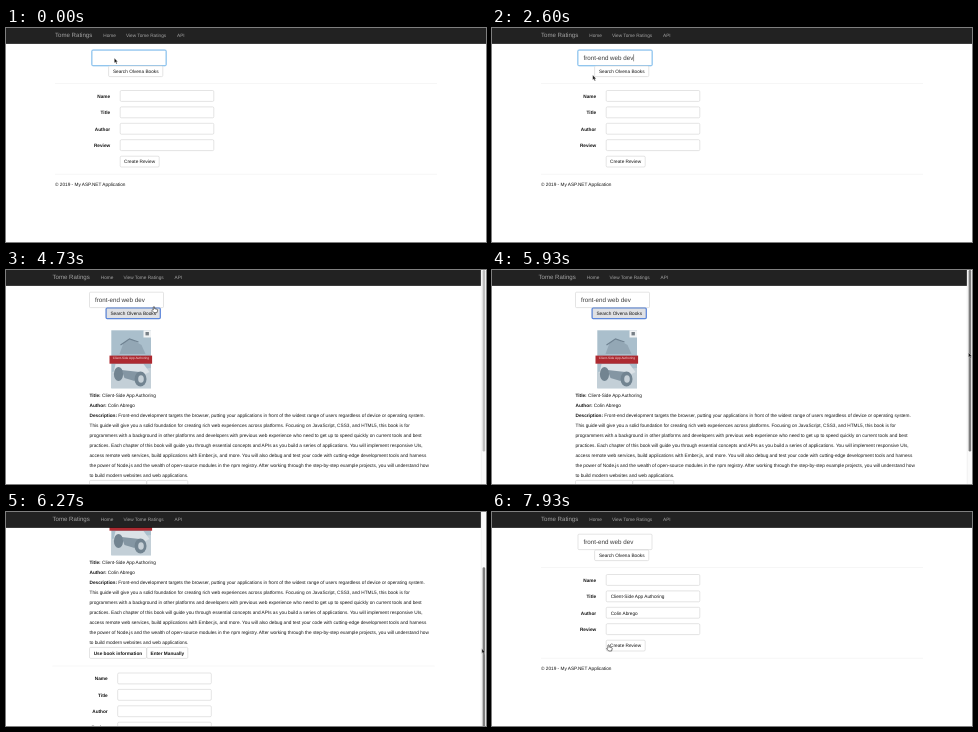
These frames come from a looping animation (480 px wide and 214 px high, 8 s). An HTML page:

```html
<!DOCTYPE html>
<html lang="en">
<head>
<meta charset="utf-8">
<title>Tome Ratings</title>
<style>
  html, body { margin: 0; width: 100%; height: 100%; overflow: hidden; background: #fff; }
  svg { display: block; width: 100vw; height: 100vh; }
  text {
    font: 4.73px "Liberation Sans", Arial, sans-serif;
    fill: #141414;
    text-rendering: geometricPrecision;
    white-space: pre;
  }
  .bold { font-weight: bold; }
  .big { font-size: 6.23px; fill: #3a3a3a; }
  .brand { font-size: 6.1px; }
  .nav text { fill: #a3a3a3; }
  .mid { text-anchor: middle; }
  .end { text-anchor: end; }
  .field, .btn { fill: #fff; stroke: #c8c8c8; stroke-width: .5; }
  .hover .btn { fill: #e0e1e4; stroke: #adadad; }
  .ring { fill: none; stroke: #5c87dc; stroke-width: 1.2; visibility: hidden; }
  .glow { fill: none; stroke: #66afe9; stroke-opacity: .4; stroke-width: 2; visibility: hidden; }
  .focus .ring, .focus .glow { visibility: visible; }
  .focus .field { stroke: #66afe9; stroke-width: .7; }
  .rule { stroke: #ececec; stroke-width: .5; }
  .band { font-size: 3.2px; fill: #f6dede; }
</style>
</head>
<body>
<svg viewBox="0 0 480 214" preserveAspectRatio="none">
  <rect width="480" height="214" fill="#fff"/>
  <g id="page">
    <g id="query">
      <rect class="glow" x="86" y="22.2" width="74" height="15.4" rx="1.4"/>
      <rect class="field" x="86" y="22.2" width="74" height="15.4" rx="1"/>
      <text id="typed" class="big" x="91.5" y="32.1"></text>
      <path id="caret" d="M0 26.3v7" stroke="#333" stroke-width=".5"/>
    </g>
    <g id="search">
      <rect class="btn" x="102.6" y="38" width="54.2" height="10.6" rx="1.2"/>
      <rect class="ring" x="102.6" y="38" width="54.2" height="10.6" rx="1"/>
      <text class="mid" x="129.7" y="44.9">Search Olvena Books</text>
    </g>
    <g id="book">
      <rect x="107.8" y="60.3" width="39.7" height="58" fill="#aabfcc"/>
      <path d="M107.8 102l39.7-4v20.3h-39.7z" fill="#c3cfd7"/>
      <path d="M116 84l4-11 8-4 10 6 4 9z" fill="#93a7b5"/>
      <path d="M117 75l9-6 9 3" fill="none" stroke="#6f8291" stroke-width="1.2"/>
      <path d="M112 94h28l6 8-8 4-16-1-12-2z" fill="#dbe2e7"/>
      <path d="M118 100l18 2-5 9-10-3z" fill="#8496a3"/>
      <ellipse cx="115" cy="104" rx="4.6" ry="7" fill="#728491"/>
      <ellipse cx="137" cy="109" rx="6" ry="7.6" fill="#728491"/>
      <ellipse cx="137.5" cy="109" rx="2.8" ry="3.8" fill="#c6d0d7"/>
      <rect x="140" y="60.3" width="7.5" height="7.2" fill="#f1f3f4"/>
      <rect x="142" y="62" width="3.4" height="3.4" fill="#777f85"/>
      <rect x="106" y="85.6" width="42.6" height="8.1" fill="#ad2a31"/>
      <text class="band mid" x="127.4" y="89.4">Client-Side App Authoring</text>
      <g id="about"></g>
      <g id="use">
        <rect class="btn" x="86" y="210.4" width="57" height="11" rx="1.2"/>
        <rect class="ring" x="86" y="210.4" width="57" height="11" rx="1"/>
        <text class="bold mid" x="114.4" y="217.6">Use book information</text>
      </g>
      <rect class="btn" x="143.3" y="210.4" width="41" height="11" rx="1.2"/>
      <text class="bold mid" x="163.8" y="217.6">Enter Manually</text>
    </g>
    <g id="form">
      <path class="rule" d="M49 55.5H431M49 146.3H431"/>
      <g id="rows"></g>
      <rect class="btn" x="114.2" y="128.2" width="39" height="10.8" rx="1.2"/>
      <text class="mid" x="133.6" y="135.3">Create Review</text>
      <text x="49" y="158">© 2019 - My ASP.NET Application</text>
    </g>
  </g>
  <rect width="480" height="15.75" fill="#222"/>
  <rect y="15.4" width="480" height=".35" fill="#080808"/>
  <g class="nav" id="nav">
    <text class="brand" x="49" y="9.2">Tome Ratings</text>
    <text x="97.3" y="8.8">Home</text>
    <text x="120" y="8.8">View Tome Ratings</text>
    <text x="171" y="8.8">API</text>
  </g>
  <g id="bar">
    <rect x="475" width="5" height="214" fill="#fafafa"/>
    <path d="M475.2 0V214" stroke="#e4e4e4" stroke-width=".5"/>
    <rect id="thumb" x="476.6" width="2.6" height="181.6" rx="1.3"/>
  </g>
  <g id="pointer" stroke-linejoin="round">
    <path id="arrow" d="M0 0V5l1.1-1 .9 1.9.9-.4-.9-1.8h1.5z" fill="#111" stroke="#fff" stroke-width=".35"/>
    <path id="hand" d="M-.7 3.4V.4Q0-.4.6.4V2.2l2.4.6q.7.2.6 1L3 6.2H0L-2 3.9q.4-1 1.3-.5z" fill="#fff" stroke="#111" stroke-width=".55"/>
  </g>
</svg>
<script>
const $ = id => document.getElementById(id);
const LOOP = 8000, SCROLLBAR_SHIFT = -2.5, BOOK_HEIGHT = 173.5, SCROLL_END = 75;
const KEY_START = 70, KEY_GAP = 137;
const PHRASE = "front-end web dev";
const TITLE = "Client-Side App Authoring", AUTHOR = "Colin Abrego";
const DESCRIPTION = `Front-end development targets the browser, putting your applications in front of the widest range of users regardless of device or operating system.
This guide will give you a solid foundation for creating rich web experiences across platforms. Focusing on JavaScript, CSS3, and HTML5, this book is for
programmers with a background in other platforms and developers with previous web experience who need to get up to speed quickly on current tools and best
practices. Each chapter of this book will guide you through essential concepts and APIs as you build a series of applications. You will implement responsive UIs,
access remote web services, build applications with Ember.js, and more. You will also debug and test your code with cutting-edge development tools and harness
the power of Node.js and the wealth of open-source modules in the npm registry. After working through the step-by-step example projects, you will understand how
to build modern websites and web applications.`;

const HOME = { x: 108.3, y: 30 };
const MOVES = [
  { from: 2330, to: 2600, x: 100.7, y: 47 },    // beside the search box
  { from: 2730, to: 3000, x: 148, y: 36.5 },    // search button
  { from: 4730, to: 4870, x: 425, y: 99 },
  { from: 5070, to: 5870, x: 476.5, y: 82.5 },  // scrollbar
  { from: 6020, to: 6270, x: 475.8, y: 136.5 }, // drag
  { from: 6600, to: 6800, x: 132, y: 142 },
  { from: 6930, to: 7270, x: 116.6, y: 142 },   // use book information
  { from: 7870, to: 7930, x: 116.6, y: 132.8 }
];
const DRAG = MOVES[4];

const bold = label => `<tspan class="bold">${label}: </tspan>`;
const about = [bold("Title") + TITLE, bold("Author") + AUTHOR, ...(bold("Description") + DESCRIPTION).split("\n")];
$("about").innerHTML = about.map((line, i) => `<text x="86" y="${126.6 + i * 10.05}">${line}</text>`).join("");

$("rows").innerHTML = ["Name", "Title", "Author", "Review"].map((name, i) => {
  const y = 62.5 + i * 16.4;
  return `<text class="bold end" x="104.2" y="${y + 7.2}">${name}</text>
    <rect class="field" x="114.2" y="${y}" width="93.6" height="10.9" rx="1.2"/>
    <text id="in${name}" x="118.7" y="${y + 7.2}"></text>`;
}).join("");

const clamp = (v, lo, hi) => Math.min(hi, Math.max(lo, v));
const easeOut = (t, { from, to }) => 1 - (1 - clamp((t - from) / (to - from), 0, 1)) ** 3;
const show = (id, on) => $(id).style.display = on ? "" : "none";
const move = (id, x, y) => $(id).setAttribute("transform", `translate(${x} ${y})`);
const mark = (id, name, on) => $(id).classList.toggle(name, on);

function pointerAt(t) {
  return MOVES.reduce((p, m) => {
    const k = easeOut(t, m);
    return { x: p.x + (m.x - p.x) * k, y: p.y + (m.y - p.y) * k };
  }, HOME);
}

function draw(t) {
  const within = (a, b) => t >= a && t < b;
  const loaded = within(3800, 7470), filled = t >= 7470;
  const count = clamp(Math.floor((t - KEY_START) / KEY_GAP) + 1, 0, PHRASE.length);
  const scroll = loaded ? SCROLL_END * easeOut(t, DRAG) : 0;
  const dx = loaded ? SCROLLBAR_SHIFT : 0;

  $("typed").textContent = PHRASE.slice(0, count).replace(/ $/, "\u00a0");
  show("caret", count > 0 && t < 3070);
  if (count) move("caret", 91.8 + $("typed").getComputedTextLength(), 0);
  mark("query", "focus", t < 3070);
  mark("search", "hover", within(2800, 7470));
  mark("search", "focus", within(3070, 7270));
  mark("use", "hover", within(7000, 7470));
  mark("use", "focus", within(7270, 7470));

  move("page", dx, -scroll);
  move("nav", dx, 0);
  move("form", 0, loaded ? BOOK_HEIGHT : 0);
  show("book", loaded);
  $("inTitle").textContent = filled ? TITLE : "";
  $("inAuthor").textContent = filled ? AUTHOR : "";

  show("bar", loaded);
  $("thumb").setAttribute("y", scroll * .735);
  $("thumb").setAttribute("fill", within(5600, 6670) ? "#7d7d7d" : "#bdbdbd");

  const { x, y } = pointerAt(t);
  const hand = within(2800, 4800) || t >= 6800;
  move("pointer", x, y);
  show("pointer", !within(KEY_START, 2330));
  show("arrow", !hand);
  show("hand", hand);
}

function tick() {
  const step = Math.floor((performance.now() % LOOP + 4) * .015);
  draw(Math.round(step * 20 / 3) * 10 % LOOP);
  requestAnimationFrame(tick);
}
tick();
</script>
</body>
</html>
```
